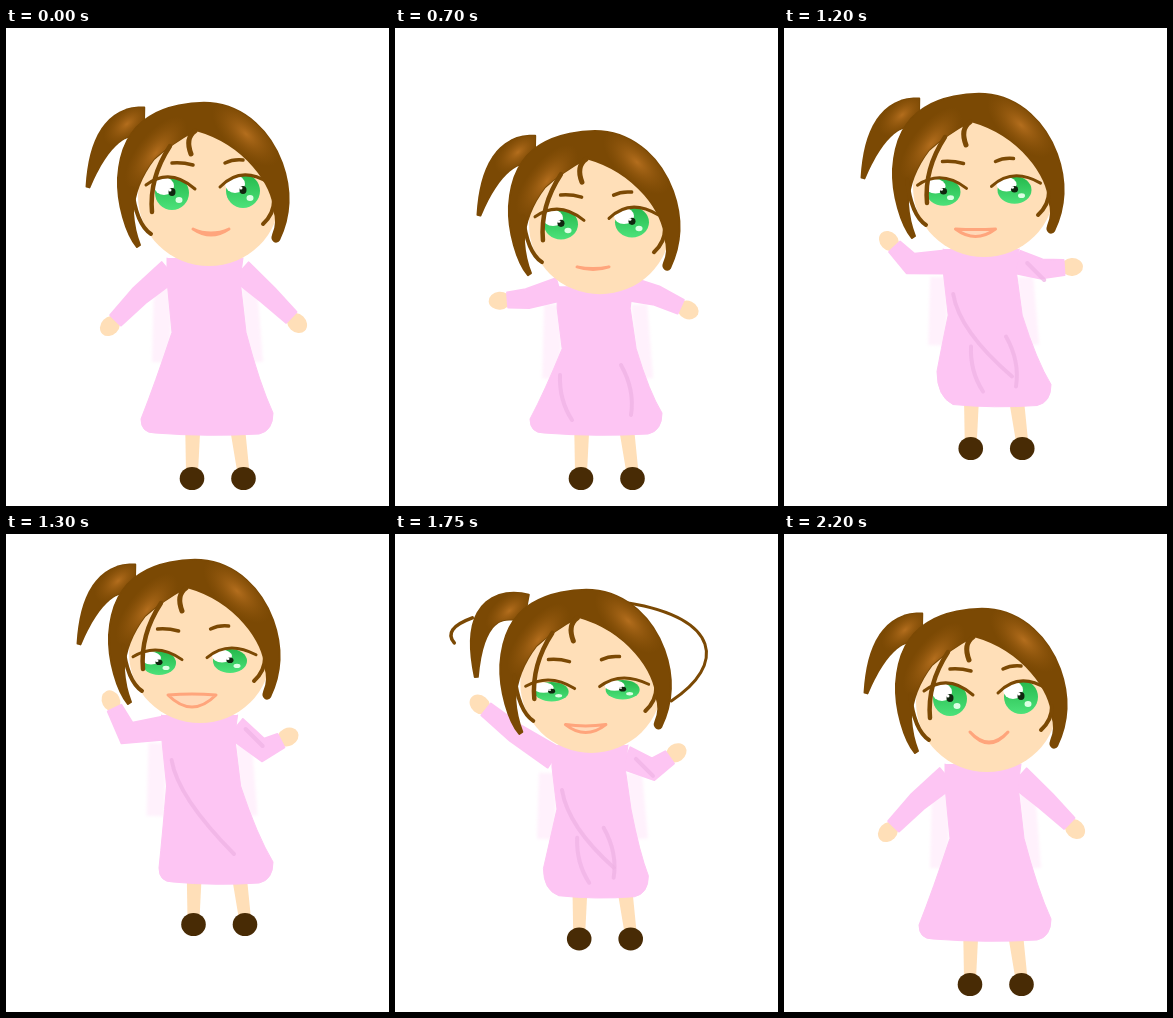
An HTML page with a canvas that plays this animation: 383x478 px, repeating every 2700 ms.

```html
<!DOCTYPE html>
<html lang="en">
<head>
<meta charset="utf-8">
<title>Jumping girl</title>
<style>
  html, body { margin: 0; width: 100%; height: 100%; overflow: hidden; background: #fff; }
  canvas { display: block; width: 100vw; height: 100vh; }
</style>
</head>
<body>
<canvas id="stage"></canvas>
<script>
const W = 383, H = 478, LOOP = 2700;
const PINK = '#fdc5f3', FOLD = '#efb3e5', SKIN = '#ffdfb8', HAIR = '#7b4904', LIP = '#ffa57c', SHOE = '#482b05';
const canvas = document.getElementById('stage');
const scale = window.devicePixelRatio || 1;
canvas.width = W * scale;
canvas.height = H * scale;
const c = canvas.getContext('2d');

// Hair is drawn in the coordinates of the standing head.
const CAP = new Path2D('M131 219C120 206 111 175 112 150C114 118 125 100 143 89C160 78 185 74 204 75' +
  'C240 78 265 105 276 135C285 160 286 185 273 212C270 216 265 212 267 207C271 198 271 190 268 182' +
  'C268 158 240 116 190 102C172 112 158 122 148 131C135 148 128 165 127 185C128 200 132 212 134 217Z');

// eye: dx, dy, openness; mouth: x, y, half width, upper and lower sag;
// hem: x, half width, puff; arms: elbow and hand.
const stand = {
  head: [0, 0], feet: [0, 0], hem: [201, 66, 0], left: [[133, 268], [104, 298]], right: [[262, 267], [291, 295]],
  eye: [0, 0, 1], brow: 0, mouth: [205, 201, 18, 4, 6],
  sway: 0, wisp: 0, lock: 0, pleat: 0, sash: 0
};
const sink = {
  ...stand, head: [0, 23], left: [[133, 268], [104, 298]], right: [[267, 270], [291, 295]],
  eye: [0, 3, .85], mouth: [200, 212, 16, 1, 2], pleat: 20
};
const crouch = {
  ...stand, head: [3, 31], hem: [210, 57, 1], left: [[132, 272], [105, 259]], right: [[258, 266], [294, 275]],
  eye: [-3, 3, .92], brow: 6, mouth: [194, 210, 16, 2, 3], pleat: 40
};
const hop = {
  ...stand, head: [-9, -49], feet: [1.5, -60], hem: [210, 57, 0], left: [[121, 199], [105, 167]], right: [[257, 216], [282, 203]],
  eye: [-4, 13, .7], brow: 9, mouth: [195, 210, 24, -1, 12], sash: 1
};
const leap = {
  ...stand, head: [-13, -59], feet: [-2.5, -69], hem: [196, 50, 0], left: [[112, 156], [74, 120]], right: [[255, 211], [278, 194]],
  eye: [-3, 9, .88], brow: 9, mouth: [197, 209, 22, 2, 9], sway: 1, wisp: 1, sash: 1
};
const land = {
  ...stand, head: [5, 55], feet: [-.5, -2], hem: [210, 57, 1], left: [[136, 279], [105, 264]], right: [[264, 280], [287, 265]],
  eye: [-2, 17, 0], brow: 11, mouth: [198, 211, 17, 0, 6], lock: 1, pleat: 45
};
const smile = { ...stand, mouth: [205, 198, 19, 10, 11] };

const lerp = (a, b, t) => typeof a === 'number' ? a + (b - a) * t : a.map((v, i) => lerp(v, b[i], t));
function mix(a, b, t, extra) {
  const pose = {};
  for (const k in a) pose[k] = lerp(a[k], b[k], t);
  return { ...pose, ...extra };
}

const steps = [
  [0, stand], [500, sink],
  [700, mix(sink, crouch, .65, { hem: sink.hem })],
  [900, crouch],
  [1200, mix(crouch, hop, .5)],
  [1300, hop],
  [1450, mix(hop, leap, .6, { head: [-12, -59], wisp: 0 })],
  [1650, leap],
  [1750, mix(leap, land, .35, { wisp: 1.8, sway: 1 })],
  [1850, mix(leap, land, .7)],
  [1900, land],
  [2100, mix(land, smile, .6)],
  [2200, smile]
];

function fill(color, path) {
  c.fillStyle = color;
  c.fill(path);
}
function line(path, width, color) {
  c.lineWidth = width;
  c.strokeStyle = color;
  c.stroke(typeof path === 'string' ? new Path2D(path) : path);
}
function shape(color, path, edge) {
  fill(color, path);
  line(path, edge, color);
}
function oval(x, y, rx, ry, color, angle = 0) {
  const path = new Path2D();
  path.ellipse(x, y, rx, ry, angle, 0, 7);
  fill(color, path);
}

// A band along a polyline with mitred joints; width(s) is half its breadth.
function ribbon(points, width) {
  const last = points.length - 1, near = [], far = [];
  const normal = i => {
    const [a, b] = [points[i], points[i + 1]], d = Math.hypot(b[0] - a[0], b[1] - a[1]);
    return [(a[1] - b[1]) / d, (b[0] - a[0]) / d];
  };
  points.forEach(([x, y], i) => {
    const m = normal(Math.max(i - 1, 0)), n = normal(Math.min(i, last - 1));
    const k = width(i / last) / (1 + m[0] * n[0] + m[1] * n[1]);
    const dx = (m[0] + n[0]) * k, dy = (m[1] + n[1]) * k;
    near.push([x + dx, y + dy]);
    far.unshift([x - dx, y - dy]);
  });
  const path = new Path2D();
  [...near, ...far].forEach(p => path.lineTo(...p));
  path.closePath();
  return path;
}

function glow(x, y, rx, ry, angle) {
  c.save();
  c.translate(x, y);
  c.rotate(angle);
  c.scale(rx, ry);
  const g = c.createRadialGradient(0, 0, 0, 0, 0, 1);
  g.addColorStop(0, 'rgba(186,114,32,.9)');
  g.addColorStop(1, 'rgba(150,90,15,0)');
  oval(0, 0, 1, 1, g);
  c.restore();
}
function hair(path, ...glows) {
  shape(HAIR, path, 2);
  c.save();
  c.clip(path);
  glows.forEach(g => glow(...g));
  c.restore();
}

function drawArm(shoulder, [elbow, hand]) {
  const angle = Math.atan2(hand[1] - elbow[1], hand[0] - elbow[0]);
  const wrist = [hand[0] - 8 * Math.cos(angle), hand[1] - 8 * Math.sin(angle)];
  oval(...hand, 11, 9, SKIN, angle);
  shape(PINK, ribbon([shoulder, elbow, wrist], s => 11.5 - 4 * s), 2);
}

function drawLeg(x, slant) {
  fill(SKIN, ribbon([[x - slant, 385], [x, 445]], s => 8 - 2 * s));
  oval(x, 450.5, 12.3, 11.5, SHOE);
}

function drawBody(p) {
  const [hx, half, puff] = p.hem;
  const x = 199 + .6 * p.head[0], top = 230 + p.head[1], hem = 407 + .95 * p.feet[1];
  const waist = lerp(top, hem, .42), mid = lerp(waist, hem, .5);
  const shoulder = top + 13 - .35 * Math.max(0, p.head[1]);
  const l = hx - half, r = hx + half, wl = x - 33, wr = x + 41;

  c.save();
  c.globalAlpha = .25;
  c.filter = 'blur(1.5px)';
  fill(PINK, ribbon([[x - 42, shoulder + 15], [x - 44, waist + 30]], () => 9));
  fill(PINK, ribbon([[x + 44, shoulder + 15], [x + 50, waist + 30]], () => 8));
  c.restore();

  c.save();
  c.translate(...p.feet);
  drawLeg(186, -1);
  drawLeg(237.5, 8);
  c.restore();

  drawArm([x - 36, shoulder], p.left);
  drawArm([x + 36, shoulder], p.right);

  const gown = new Path2D();
  gown.moveTo(x - 38, top);
  gown.lineTo(x - 38, top + 22);
  gown.lineTo(wl, waist);
  gown.quadraticCurveTo(lerp(wl, l, .55 + .3 * puff), mid - 15 * puff, l, hem - 16 - 38 * puff);
  gown.quadraticCurveTo(l, hem - 2 - 16 * puff, l + 14 + 4 * puff, hem - 2);
  gown.quadraticCurveTo(hx, hem + 2, r - 14, hem - 1);
  gown.quadraticCurveTo(r, hem - 4, r, hem - 22);
  gown.quadraticCurveTo(lerp(wr, r, .5), mid, wr, waist);
  gown.lineTo(x + 35, top + 22);
  gown.lineTo(x + 38, top);
  shape(PINK, gown, 1);

  c.globalAlpha = .75;
  if (p.pleat) {
    line(`M${hx - p.pleat - 3} ${hem - 60}q-1 25 12 45`, 4, FOLD);
    line(`M${hx + p.pleat - 8} ${hem - 70}q14 25 10 50`, 4, FOLD);
  }
  if (p.sash >= .5) {
    line(`M${x - 28} ${top + 45}Q${x - 22} ${top + 82} ${hx + 18} ${hem - 30}`, 4, FOLD);
    line(`M${x + 46} ${top + 14}l17 17`, 4, FOLD);
  }
  c.globalAlpha = 1;
}

function drawEye(x, y, open, side) {
  const outer = x + side * 26, inner = x - side * 23;
  const out = y - 2 - 6 * open, into = y - 2 - 2 * open;
  const peak = 2 * (y - 6 - 10 * open) - (out + into) / 2;
  const lid = `M${outer} ${out}Q${x - 2} ${peak} ${inner} ${into}`;
  if (open > .4) {
    c.save();
    c.clip(new Path2D(lid + `V${y + 30}H${outer}Z`));
    c.translate(x, y);
    c.scale(1, open);
    const g = c.createLinearGradient(0, -17, 0, 17);
    g.addColorStop(0, '#25b84b');
    g.addColorStop(1, '#4ce27a');
    oval(0, 0, 17, 17, g);
    oval(-8, -7, 10, 9, '#fff');
    oval(0, -1, 3.5, 4, '#10250f');
    oval(-2, -3, 1.5, 1.5, '#fff');
    oval(7, 7, 3.5, 3, '#dcffe4');
    c.restore();
  }
  line(lid, 3, HAIR);
}

function drawFace(p) {
  oval(203, 168, 71, 70, SKIN);
  const [dx, dy, open] = p.eye;
  drawEye(166 + dx, 165 + dy, open, -1);
  drawEye(237 + dx, 163 + dy, open, 1);
  line(`M${166 - .6 * p.brow} ${135 + p.brow}q10 -1 21 2`, 3.5, HAIR);
  line(`M${219 - .6 * p.brow} ${135 + p.brow}q8 -4 18 -3`, 3.5, HAIR);
  const [x, y, w, up, low] = p.mouth;
  const lips = `M${x - w} ${y}Q${x} ${y + 2 * up} ${x + w} ${y}Q${x} ${y + 2 * low} ${x - w} ${y}Z`;
  fill('#ffd9b8', new Path2D(lips));
  line(lips, 3, LIP);
}

function drawHair(p) {
  const bend = [98 - 15 * p.sway, 90 - 10 * p.sway], tip = [82 + 6 * p.sway, 159 + 3 * p.sway];
  const spine = Array.from({ length: 17 }, (_, i) => {
    const t = i / 16;
    return lerp(lerp([138, 93], bend, t), lerp(bend, tip, t), t);
  });
  hair(ribbon(spine, s => 1.5 + 12 * (1 - s * s)), [121, 96, 28, 15, -.7]);
  if (p.sway > .5) line('M84 103Q54 114 66 128', 3.5, HAIR);
  if (p.lock >= .5) line('M100 104Q65 122 71 155', 4.5, HAIR);
  if (p.wisp > 0) {
    const w = p.wisp * 40;
    line(`M240 88C${260 + w} 103 ${266 + w} 150 283 186`, 3, HAIR);
  }
  hair(CAP, [150, 125, 44, 19, -.9], [240, 106, 42, 20, .75]);
  line('M126 160Q130 196 145 206', 4, HAIR);
  line('M164 118Q143 150 146 184', 4.5, HAIR);
  line('M189 103Q179 110 185 126', 5, HAIR);
  line('M268 172Q268 186 257 196', 4, HAIR);
}

function draw(p) {
  c.setTransform(scale, 0, 0, scale, 0, 0);
  c.fillStyle = '#fff';
  c.fillRect(0, 0, W, H);
  c.lineCap = c.lineJoin = 'round';
  drawBody(p);
  c.save();
  c.translate(...p.head);
  drawFace(p);
  drawHair(p);
  c.restore();
}

let shown;
function tick(now) {
  const t = now % LOOP;
  const pose = steps.findLast(s => s[0] <= t)[1];
  if (pose !== shown) draw(shown = pose);
  requestAnimationFrame(tick);
}
draw(shown = stand);
requestAnimationFrame(tick);
</script>
</body>
</html>
```
